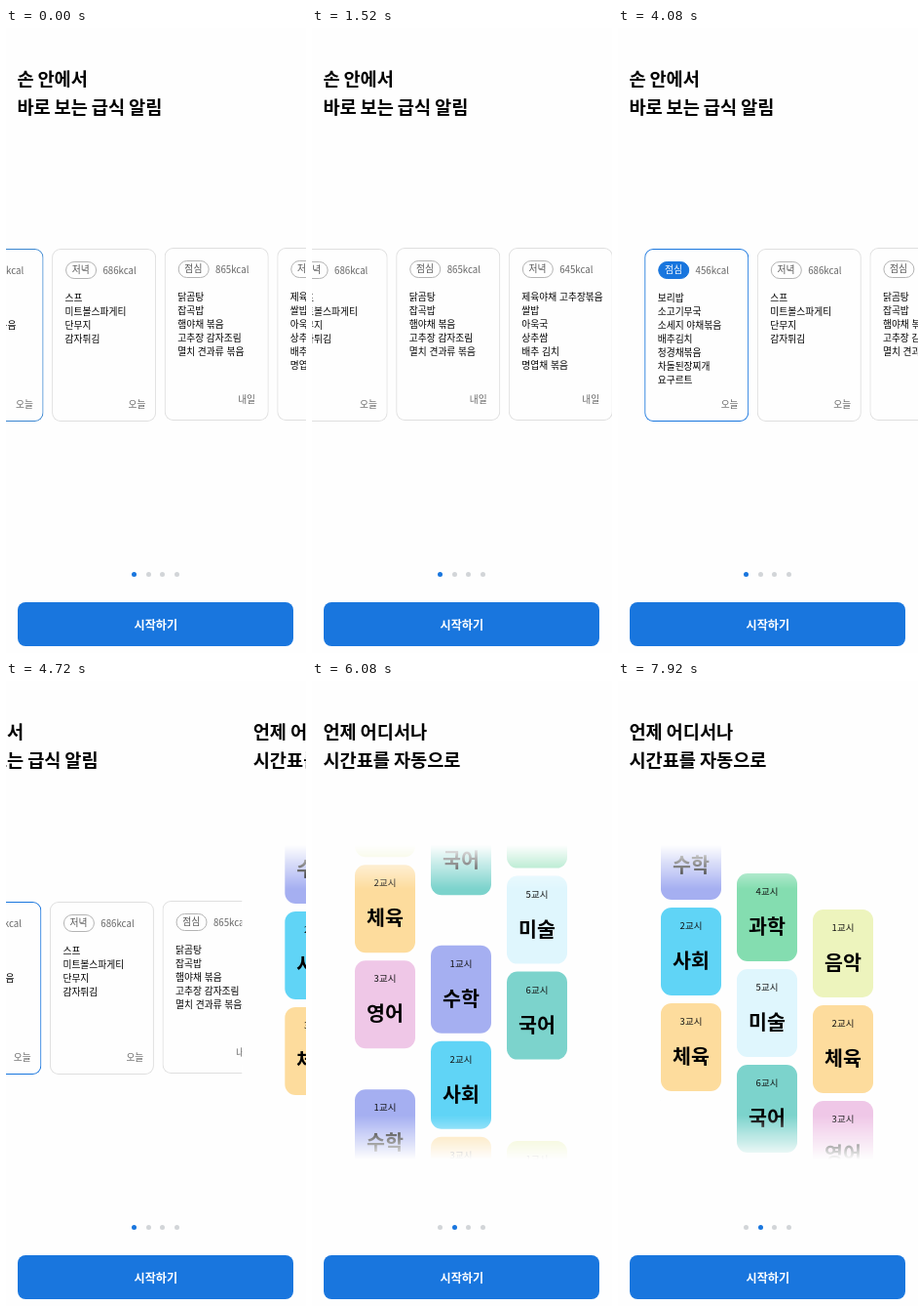
These frames come from a looping animation (308 by 640 pixels, 8 s). An HTML page:

```html
<!DOCTYPE html>
<html lang="ko">
<head>
<meta charset="utf-8">
<style>
html, body { margin: 0; width: 100%; height: 100%; overflow: hidden; background: #fefefe; }
body { font-family: 'Noto Sans CJK KR', 'Noto Sans CJK', sans-serif; }
#stage { position: absolute; left: 0; top: 0; width: 308px; height: 640px; overflow: hidden; }
.page { position: absolute; left: 0; top: 0; width: 308px; height: 540px; overflow: hidden; }
.text { position: absolute; white-space: nowrap; line-height: 1; }
.title { word-spacing: -1.3px; }
.meal { position: absolute; left: 0; width: 107px; height: 176.5px; border-radius: 9px;
  background: #fefefe; box-shadow: inset 0 0 0 1px #dfdfdf; }
.pill { position: absolute; top: 13px; width: 32px; height: 18px; box-sizing: border-box;
  border: 1px solid #b4b4b4; border-radius: 9px; }
.pill.on { background: #1976de; border-color: #1976de; }
#window { position: absolute; left: 0; top: 168px; width: 308px; height: 322px; overflow: hidden;
  -webkit-mask-image: linear-gradient(transparent, #000 45px, #000 277px, transparent);
  mask-image: linear-gradient(transparent, #000 45px, #000 277px, transparent); }
.set { position: absolute; top: -168px; width: 62px; }
.lesson { position: absolute; width: 62px; height: 90px; border-radius: 11px; }
.dot { position: absolute; top: 557px; width: 5px; height: 5px; border-radius: 50%; }
#start { position: absolute; left: 11.7px; top: 588px; width: 283.8px; height: 45.3px;
  border-radius: 8px; background: #1976de; }
</style>
</head>
<body>
<div id="stage">
  <div class="page" id="meals"></div>
  <div class="page" id="timetable"><div id="window"></div></div>
  <div id="start"></div>
</div>
<script>
const LOOP = 8000, STEP = 80, BLUE = '#1976de';
const $ = id => document.getElementById(id);

function add(parent, cls, style = {}) {
  const el = document.createElement('div');
  el.className = cls;
  Object.assign(el.style, style);
  parent.appendChild(el);
  return el;
}

// y is the optical centre of the line; align is 0 left, 0.5 centre, 1 right
function text(parent, str, x, y, size, { weight = 400, color = '#000', align = 0 } = {}) {
  const el = add(parent, 'text', {
    left: x + 'px', top: y - size * 0.556 + 'px', fontSize: size + 'px',
    fontWeight: weight, color, transform: `translateX(${-100 * align}%)`
  });
  el.textContent = str;
  return el;
}

function title(page, lines) {
  lines.forEach((s, i) =>
    text(page, s, 11.4, 52.1 + i * 29.5, 18.65, { weight: 700 }).classList.add('title'));
}

title($('meals'), ['손 안에서', '바로 보는 급식 알림']);
title($('timetable'), ['언제 어디서나', '시간표를 자동으로']);
text($('start'), '시작하기', 142.1, 24, 12.1, { weight: 700, color: '#fff', align: 0.5 });

const dots = [131.5, 146, 160.5, 175].map(x => add($('stage'), 'dot', { left: x - 2.5 + 'px' }));

const MEALS = [
  ['점심', 456, '오늘', '보리밥/소고기무국/소세지 야채볶음/배추김치/청경채볶음/차돌된장찌개/요구르트'],
  ['저녁', 686, '오늘', '스프/미트볼스파게티/단무지/감자튀김'],
  ['점심', 865, '내일', '닭곰탕/잡곡밥/햄야채 볶음/고추장 감자조림/멸치 견과류 볶음'],
  ['저녁', 645, '내일', '제육야채 고추장볶음/쌀밥/아욱국/상추쌈/배추 김치/명엽채 볶음']
];

const meals = MEALS.map(([time, kcal, day, menu], i) => {
  const today = i < 2, first = i === 0;
  const card = add($('meals'), 'meal', { top: (today ? 226 : 225) + 'px' });
  add(card, first ? 'pill on' : 'pill', { left: '13.7px' });
  text(card, time, 29.7, 22.2, 9.8, { weight: 500, color: first ? '#fff' : '#555', align: 0.5 });
  text(card, kcal + 'kcal', 52.4, 23, 9.7, { color: '#666' });
  menu.split('/').forEach((s, n) => text(card, s, 13.5, 51.5 + n * 14, 9.75));
  const label = text(card, day, today ? 96.3 : 93.3, today ? 160 : 156, 9.7, { color: '#666', align: 1 });
  return { card, label };
});

const COLORS = {
  수학: '#a5aff1', 사회: '#60d4f6', 체육: '#fddc9d', 과학: '#84ddb0',
  미술: '#dff6fd', 국어: '#7cd3cc', 음악: '#edf4bd', 영어: '#efc7e7'
};
const SETS = {
  A: [1, '수학', '사회', '체육'],
  B: [4, '과학', '미술', '국어'],
  C: [1, '음악', '체육', '영어']
};

function lessonSet(key, x) {
  const [from, ...names] = SETS[key];
  const set = add($('window'), 'set', { left: x + 'px' });
  names.forEach((name, i) => {
    const card = add(set, 'lesson', { top: i * 98.2 + 'px', background: COLORS[name] });
    text(card, from + i + '교시', 31, 19.2, 9.5, { color: '#111', align: 0.5 });
    text(card, name, 31, 54.3, 20.6, { weight: 700, align: 0.5 });
  });
  return set;
}

// path rows: time, top of the upper set, speed in px per ms
const COLUMNS = [
  { x: 44, sets: 'CA', gap: 327.9,
    path: [[4900, -190, 0], [5440, -50.4, 0.27], [6720, 160.6, 0.05], [7920, -194, -0.03]] },
  { x: 122, sets: 'BA', gap: 337.4,
    path: [[4900, 190, 0], [5440, 60.1, -0.25], [6720, -126.4, -0.04], [7920, 197, 0.02]] },
  { x: 200, sets: 'BC', gap: 369.4,
    path: [[4900, -140, 0], [5440, -31.4, 0.24], [6720, 173.8, 0.05], [7920, -135.4, -0.02]] }
].map(c => ({ ...c, els: [...c.sets].map(k => lessonSet(k, c.x)) }));

const clamp = v => Math.min(1, Math.max(0, v));
const progress = (t, start, length) => clamp((t - start) / length);

// cubic-bezier(.4, 0, .2, 1)
function glide(x) {
  let lo = 0, hi = 1, u = 0.5;
  for (let i = 0; i < 24; i++) {
    u = (lo + hi) / 2;
    const bx = 1.2 * u * (1 - u) ** 2 + 0.6 * u * u * (1 - u) + u ** 3;
    if (bx < x) lo = u; else hi = u;
  }
  return 3 * u * u * (1 - u) + u ** 3;
}

function follow(path, t) {
  if (t <= path[0][0]) return path[0][1];
  const i = path.findIndex(p => p[0] >= t);
  if (i < 0) return path[path.length - 1][1];
  const [t0, a, va] = path[i - 1], [t1, b, vb] = path[i];
  const d = t1 - t0, u = (t - t0) / d, w = 1 - u;
  return (1 + 2 * u) * w * w * a + u * w * w * d * va +
    u * u * (3 - 2 * u) * b - u * u * w * d * vb;
}

function drawMeals(t) {
  const again = t >= 2000;
  const left = again ? 41.8 - 0.0503 * Math.max(0, t - 3790) : -68.5 - 0.0503 * t;
  const grow = again ? 0.46 * (1 - glide(progress(t, 2540, 680))) : 0;
  meals.forEach(({ card }, i) => {
    const x = left + i * 115.6 + (i ? 53.5 * grow : 0);
    card.style.transform = `translateX(${x}px)`;
  });
  const { card, label } = meals[0];
  card.style.transform += ` translateY(${-Math.min(3, 10 * grow)}px) scale(${1 + grow})`;
  card.style.boxShadow = `inset 0 0 0 ${1 + Math.min(1.2, grow * 5.5)}px ${grow ? BLUE : '#3a86d0'}`;
  const inset = Math.min(6, 25 * grow);
  label.style.transform = `translate(-100%, 0) translate(${-inset}px, ${-inset}px)`;
}

function drawTimetable(t) {
  for (const { els, gap, path } of COLUMNS) {
    const y = follow(path, t);
    els.forEach((el, i) => { el.style.transform = `translateY(${y + i * gap}px)`; });
  }
}

function draw(t) {
  drawMeals(t);
  drawTimetable(t);
  const swipe = glide(progress(t, 4600, 500));
  $('meals').style.transform = `translateX(${-308 * swipe}px)`;
  $('timetable').style.transform = `translateX(${308 * (1 - swipe)}px)`;
  const active = swipe > 0.5 ? 1 : 0;
  dots.forEach((d, i) => { d.style.background = i === active ? BLUE : '#d2d5d8'; });
}

const begin = performance.now();
function tick() {
  const t = Math.max(0, performance.now() - begin) % LOOP;
  draw(Math.floor(t / STEP) * STEP);
  requestAnimationFrame(tick);
}
tick();
</script>
</body>
</html>
```
